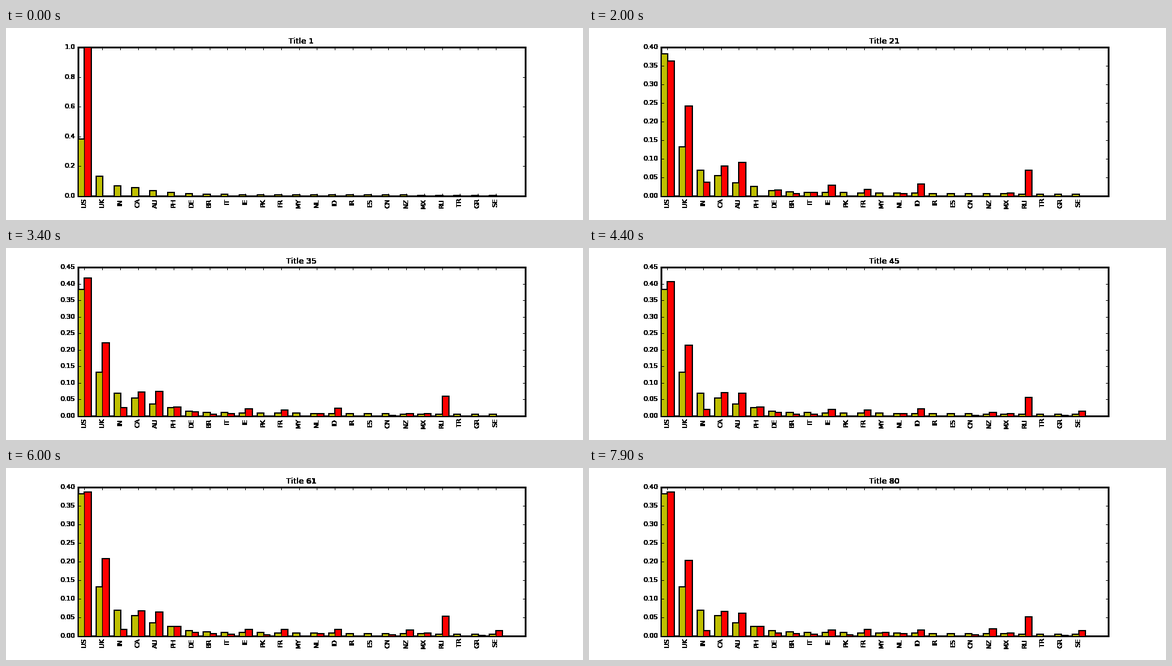
A matplotlib script for the animation above (8000 ms loop, 960 by 320 pixels).

```python
import numpy as np
import matplotlib.pyplot as plt
from matplotlib.animation import FuncAnimation
from matplotlib.transforms import Affine2D

FRAMES, INTERVAL = 80, 100
WIDTH = 0.35

plt.rcParams.update({
    "font.family": "DejaVu Sans", "font.size": 10, "text.kerning_factor": 6,
    "axes.titlesize": 12, "axes.titlepad": 5, "axes.linewidth": 2.7,
    "xtick.direction": "in", "ytick.direction": "in",
    "xtick.top": True, "ytick.right": True, "ytick.alignment": "center",
    "xtick.major.size": 4, "ytick.major.size": 4,
    "xtick.major.width": 0.5, "ytick.major.width": 0.5,
    "xtick.major.pad": 3.55, "ytick.major.pad": 4.45,
})

COUNTRIES = ("US UK IN CA AU PH DE BR IT IE PK FR "
             "MY NL ID IR ES CN NZ MX RU TR GR SE").split()
# A steep head, then a slowly falling tail
EXPECTED = [.383, .132, .069, .0545, .036, .0255, .0145, .0115,
            *np.geomspace(.0102, .0047, 16)]

# Leading share: (sample, share) key points
LEADER = [(1, 1), (9, .348), (21, .363), (28, .401),
          (35, .417), (45, .406), (61, .387), (80, .387)]
# Other shares: sample of first appearance, share then, share it settles to
JOINERS = {
    "UK": (4, .46, .19), "CA": (5, .15, .06), "AU": (5, .22, .05),
    "DE": (6, .043, .006), "IT": (7, .026, .002), "FR": (7, .018),
    "BR": (8, .006), "NL": (8, .004, .0075), "IN": (12, .059, .007),
    "IE": (16, .0355, .0105), "ID": (16, .039, .011), "MX": (18, .008),
    "RU": (21, .07, .045), "PH": (28, .029, .023), "NZ": (30, .003, .029),
    "CN": (30, .0025), "GR": (44, .002), "SE": (44, .0145),
    "PK": (55, .0035), "MY": (70, .010),
}


def leader_share(n):
    """Cumulative count grows linearly between key points."""
    samples, shares = np.transpose(LEADER)
    return np.interp(n, samples, samples * shares) / n


def joiner_share(n, start=np.inf, first=0, late=None):
    """A running mean: the first value fades out as 1/n."""
    if n < start:
        return 0
    late = first if late is None else late
    return late + (first - late) * start / n


def observed(n):
    return [leader_share(n)] + [joiner_share(n, *JOINERS.get(c, ()))
                                for c in COUNTRIES[1:]]


def harden(img, dpi):
    """Make soft edges nearly solid, as after repeated overdrawing."""
    img = img.copy()
    img[..., 3] = 1 - (1 - img[..., 3]) ** 60
    return img, 0, 0


def outlined_bars(x, heights, color):
    """Bars whose outline is heavy outside and thin inside."""
    style = dict(width=WIDTH, align="edge", color=color, edgecolor="black")
    return (ax.bar(x, heights, linewidth=2.7, zorder=0.9, **style),
            ax.bar(x, heights, linewidth=1, zorder=1, **style))


fig = plt.figure(figsize=(12, 4), dpi=80, facecolor="white")
ax = fig.add_axes([0.125, 0.125, 0.775, 0.775])
x = np.arange(len(COUNTRIES))
outlined_bars(x, EXPECTED, "y")
red_layers = outlined_bars(x + WIDTH, observed(1), "r")
ax.set_xlim(0, 25)
ax.set_xticks(x + WIDTH, COUNTRIES, rotation=90)
ax.spines[:].set_zorder(0.8)

# Text sits half a pixel further left
half_left = Affine2D().translate(-0.5, 0)
for label in ax.get_xticklabels():
    label.set_transform(label.get_transform() + half_left)
for artist in (ax.xaxis, ax.yaxis, ax.title):
    artist.set_agg_filter(harden)


def scale_y(top):
    for step, fmt in ((0.05, "%.2f"), (0.1, "%.1f"), (0.2, "%.1f")):
        bins = int(np.ceil(top / step - 1e-9))
        if bins <= 9:
            break
    ticks = step * np.arange(bins + 1)
    ax.set_yticks(ticks, [fmt % t for t in ticks])
    ax.set_ylim(0, bins * step)


def update(frame):
    n = frame + 1
    values = observed(n)
    for layer in red_layers:
        for bar, value in zip(layer, values):
            bar.set_height(value)
    scale_y(max(values + EXPECTED))
    ax.set_title(f"Title {n}", x=0.5 - 0.5 / ax.bbox.width)
    return []


anim = FuncAnimation(fig, update, frames=FRAMES, interval=INTERVAL,
                     init_func=lambda: update(0), repeat=True, repeat_delay=0)
plt.show()
```
